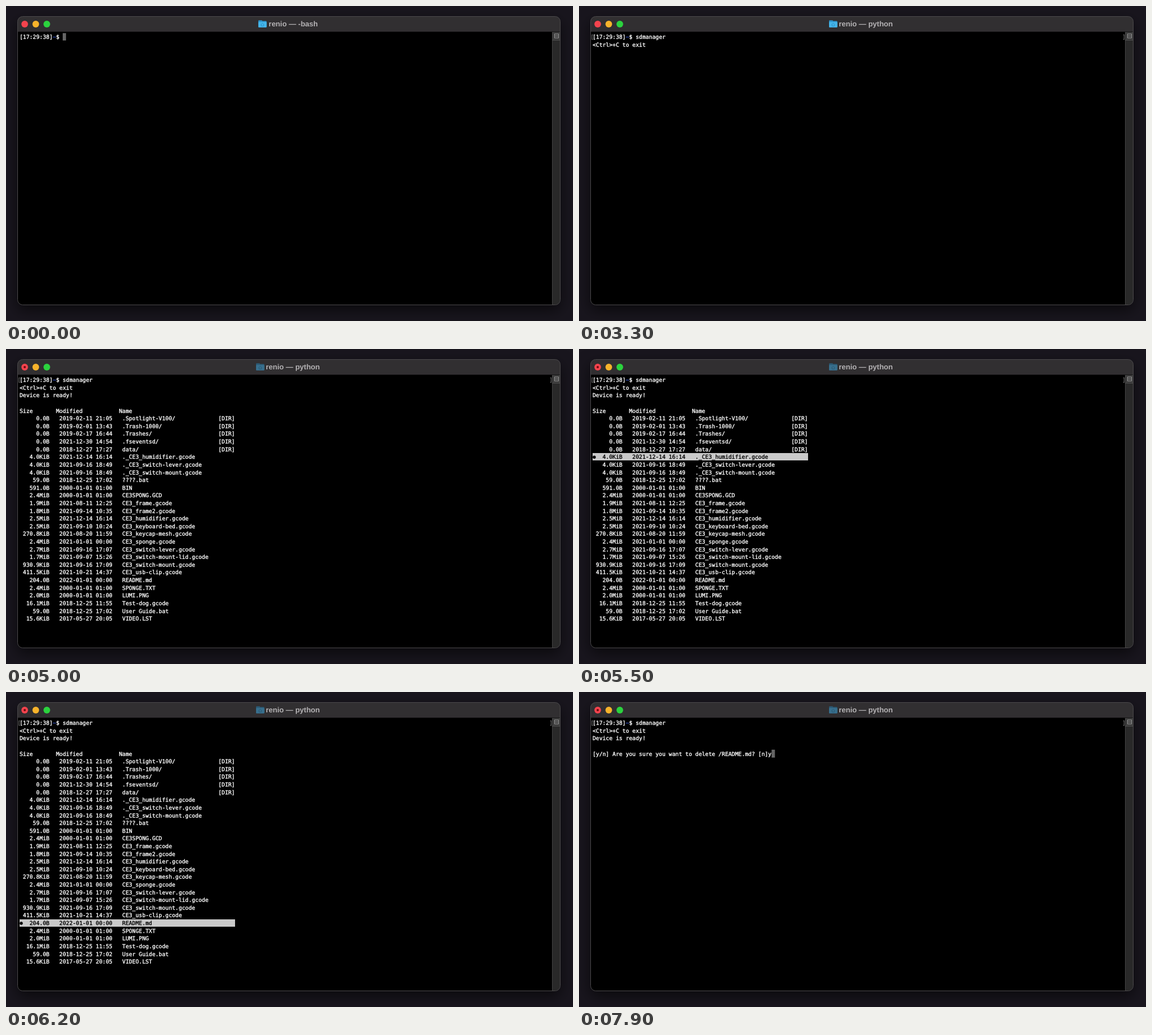
Write an HTML page with a canvas that moves like this. It is 1000x557 px and loops after 8000 ms.

```html
<!DOCTYPE html>
<html lang="en">
<head>
<meta charset="utf-8">
<title>Terminal file manager</title>
<style>
html, body { margin: 0; width: 100%; height: 100%; overflow: hidden; background: #19161e; }
canvas { display: block; }
</style>
</head>
<body>
<canvas id="stage" width="1000" height="557"></canvas>
<script>
const ctx = document.getElementById('stage').getContext('2d');
const LOOP = 8000;
const LEFT = 24, TOP = 47.7, CELL = 5.846, ROW = 13.61;
const FIRST = 5; // screen row of the first list entry
const MONO = '9.71px "DejaVu Sans Mono", monospace';
const COMMAND = 'sdmanager';
const QUESTION = '[y/n] Are you sure you want to delete /README.md? [n]';
const HEADER = 'Size'.padEnd(11) + 'Modified'.padEnd(19) + 'Name';

const files = `0.0B|2019-02-11 21:05|.Spotlight-V100/
0.0B|2019-02-01 13:43|.Trash-1000/
0.0B|2019-02-17 16:44|.Trashes/
0.0B|2021-12-30 14:54|.fseventsd/
0.0B|2018-12-27 17:27|data/
4.0KiB|2021-12-14 16:14|._CE3_humidifier.gcode
4.0KiB|2021-09-16 18:49|._CE3_switch-lever.gcode
4.0KiB|2021-09-16 18:49|._CE3_switch-mount.gcode
59.0B|2018-12-25 17:02|????.bat
591.0B|2000-01-01 01:00|BIN
2.4MiB|2000-01-01 01:00|CE3SPONG.GCD
1.9MiB|2021-08-11 12:25|CE3_frame.gcode
1.8MiB|2021-09-14 10:35|CE3_frame2.gcode
2.5MiB|2021-12-14 16:14|CE3_humidifier.gcode
2.5MiB|2021-09-10 10:24|CE3_keyboard-bed.gcode
270.8KiB|2021-08-20 11:59|CE3_keycap-mesh.gcode
2.4MiB|2021-01-01 00:00|CE3_sponge.gcode
2.7MiB|2021-09-16 17:07|CE3_switch-lever.gcode
1.7MiB|2021-09-07 15:26|CE3_switch-mount-lid.gcode
930.9KiB|2021-09-16 17:09|CE3_switch-mount.gcode
411.5KiB|2021-10-21 14:37|CE3_usb-clip.gcode
204.0B|2022-01-01 00:00|README.md
2.4MiB|2000-01-01 01:00|SPONGE.TXT
2.0MiB|2000-01-01 01:00|LUMI.PNG
16.1MiB|2018-12-25 11:55|Test-dog.gcode
59.0B|2018-12-25 17:02|User Guide.bat
15.6KiB|2017-05-27 20:05|VIDEO.LST`.split('\n').map(line => {
  const [size, date, name] = line.split('|');
  const entry = size.padStart(9) + '   ' + date + '   ' + name;
  return name.endsWith('/') ? entry.padEnd(60) + '[DIR]' : entry;
});
const actions = ['  Print', '  Download', '  Delete'];

function rect(x, y, w, h, color) {
  ctx.fillStyle = color;
  ctx.fillRect(x, y, w, h);
}

function disc(x, y, r, color) {
  ctx.fillStyle = color;
  ctx.beginPath();
  ctx.arc(x, y, r, 0, 7);
  ctx.fill();
}

function panel(x, y, w, h, r, color) {
  ctx.fillStyle = color;
  ctx.beginPath();
  ctx.roundRect(x, y, w, h, r);
  ctx.fill();
}

// The thin outline gives the text its slightly heavy look.
function write(text, row, col = 0, color = '#fff') {
  const x = LEFT + col * CELL, y = TOP + 10.5 + row * ROW;
  ctx.font = MONO;
  ctx.fillStyle = ctx.strokeStyle = color;
  ctx.lineWidth = .35;
  ctx.fillText(text, x, y);
  ctx.strokeText(text, x, y);
}

function bar(row, col, width, color) {
  const y = Math.round(TOP + row * ROW);
  rect(LEFT + col * CELL, y, width * CELL, Math.round(TOP + (row + 1) * ROW) - y, color);
}

function cursor(row, col) {
  bar(row, col, 1, '#656565');
}

function list(lines, width, selected) {
  lines.forEach((line, i) => {
    const row = FIRST + i, on = i === selected;
    if (on) {
      bar(row, 0, width, '#c9c9c9');
      disc(LEFT + CELL / 2, TOP + (row + .55) * ROW, 2.7, '#000');
    }
    write(line, row, 0, on ? '#000' : '#fff');
  });
}

function folder(x, dim) {
  const back = dim ? '#2b5a75' : '#2b93cb', front = dim ? '#386f8d' : '#45b5e9';
  panel(x, 25.3, 7, 5, 1.2, back);
  panel(x, 26.5, 14.6, 11.3, 1.2, back);
  panel(x, 28.2, 14.6, 9.6, 1.2, front);
  ctx.strokeStyle = back;
  ctx.lineWidth = 1;
  ctx.beginPath();
  ctx.moveTo(x + 4.3, 33);
  ctx.lineTo(x + 7.3, 30.4);
  ctx.lineTo(x + 10.3, 33);
  ctx.moveTo(x + 5.3, 32.6);
  ctx.lineTo(x + 5.3, 35.5);
  ctx.lineTo(x + 9.3, 35.5);
  ctx.lineTo(x + 9.3, 32.6);
  ctx.stroke();
}

function drawTitle(running) {
  ctx.font = 'bold 13px "Liberation Sans", Arial, sans-serif';
  ctx.textAlign = 'right';
  ctx.fillStyle = '#b4b2b4';
  ctx.fillText('renio — ' + (running ? 'python' : '-bash'), running ? 553.5 : 550, 36);
  ctx.textAlign = 'left';
}

function drawWindow(t) {
  const running = t >= 3200, busy = t >= 4200;
  rect(0, 0, 1000, 557, '#19161e');
  ctx.save();
  ctx.shadowColor = 'rgba(0,0,0,.6)';
  ctx.shadowBlur = 26;
  ctx.shadowOffsetY = 9;
  panel(20, 18.5, 957.5, 510, 9, '#000');
  ctx.restore();

  panel(20, 18.5, 957.5, 26.5, [9, 9, 0, 0], '#312f31');
  rect(20, 45, 957, 1, '#171617');
  panel(963, 46, 14, 482, [0, 0, 8, 0], '#292929');
  rect(963, 46, 1, 482, '#414141');
  rect(964, 46, 13, 14, '#3c3c3c');
  rect(963, 60, 14, 1, '#4d4d4d');
  ctx.strokeStyle = '#949494';
  ctx.lineWidth = 1;
  ctx.strokeRect(967.5, 49.5, 7, 7);
  rect(968, 52.5, 6, 1, '#949494');

  ctx.strokeStyle = '#4c4a4c';
  ctx.beginPath();
  ctx.roundRect(20.5, 18.5, 957, 510, 9);
  ctx.stroke();

  ['#f4434d', '#f7b32b', '#2bd33e'].forEach((c, i) => disc(33 + i * 19.5, 32, 5.9, c));
  if (busy) disc(33, 32, 2, '#6d0a10');

  folder(running ? 441 : 445, busy);
  drawTitle(running);
}

function drawPrompt(t) {
  const step = Math.floor((t - 2300) / 100);
  const typed = t < 2300 ? 0 : Math.min(9, Math.round(1 + step * 4 / 3));
  write('[17:29:38]', 0);
  write('~', 0, 10, '#2f4fc0');
  write('$', 0, 11);
  if (t < 3000) cursor(0, 13 + typed);
  write(COMMAND.slice(0, typed), 0, 13);
  if (t >= 3000) {
    write('[', 0, -.6, '#6e6e6e');
    write(']', 0, 159.8, '#6e6e6e');
  }
  if (t >= 3300) write('<Ctrl>+C to exit', 1);
  if (t >= 3400) write('Device is ready!', 2);
}

function selectedFile(t) {
  const moves = [[6100, 21], [5900, 20], [5800, 18], [5700, 15], [5600, 10], [5500, 5], [5200, 1], [5100, 0]];
  const move = moves.find(([start]) => t >= start);
  return move ? move[1] : -1;
}

function drawScreen(t) {
  if (t < 4500) return;
  if (t < 4700) {
    cursor(4, 0);
  } else if (t < 6300) {
    write(HEADER, 4);
    list(files, 65, selectedFile(t));
  } else if (t < 7300) {
    write('/README.md', 4);
    list(actions, 18, t < 6400 ? -1 : t < 6900 ? 0 : t < 7000 ? 1 : 2);
  } else {
    const line = QUESTION + (t >= 7900 ? 'y' : '');
    write(line, 4);
    cursor(4, line.length);
  }
}

function frame(now) {
  const t = now % LOOP;
  ctx.textRendering = 'geometricPrecision';
  drawWindow(t);
  drawPrompt(t);
  drawScreen(t);
  requestAnimationFrame(frame);
}

requestAnimationFrame(frame);
</script>
</body>
</html>
```
